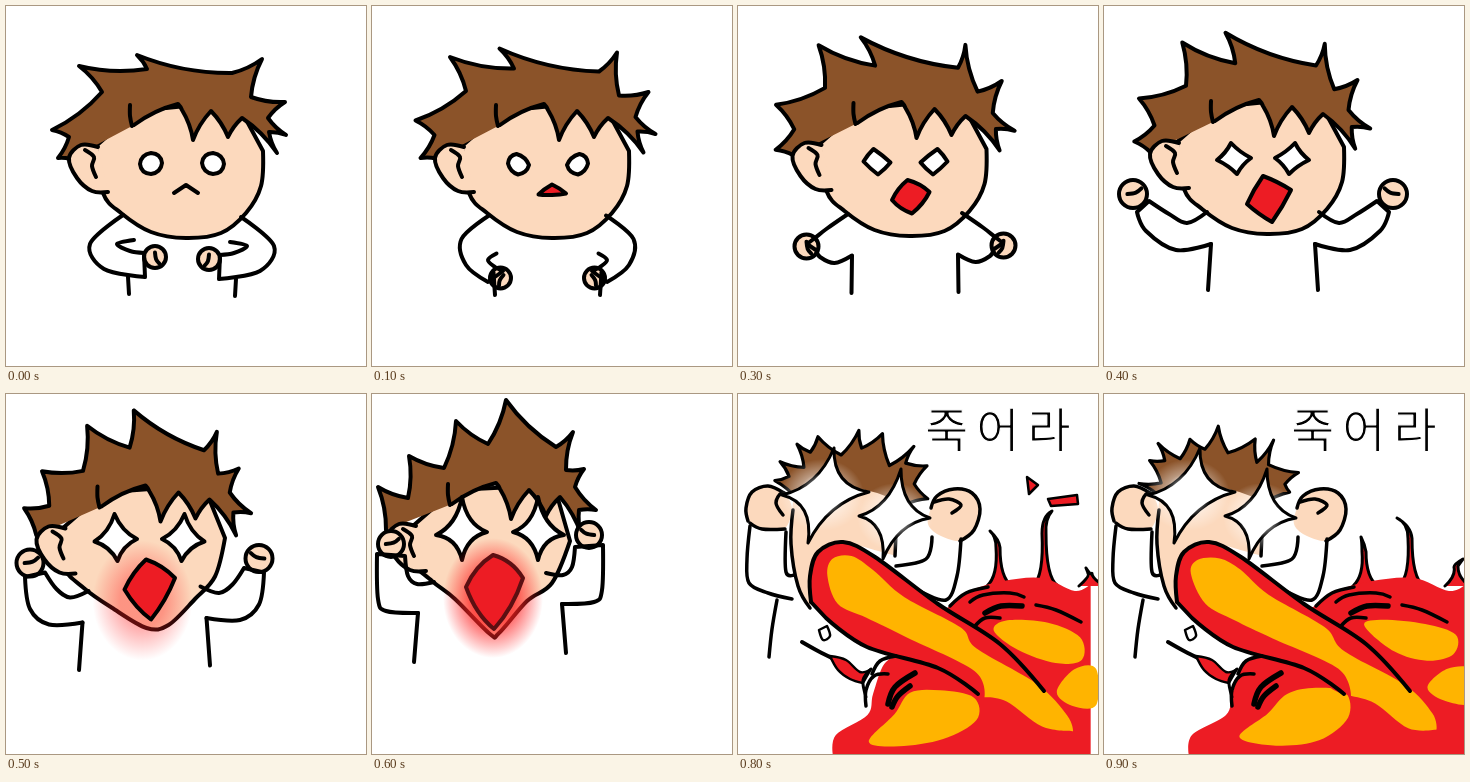
These frames come from a looping animation (360 by 360 pixels, 1100 ms). An HTML page:

```html
<!DOCTYPE html>
<html lang="ko">
<head>
<meta charset="utf-8">
<style>
html, body { margin: 0; width: 100%; height: 100%; overflow: hidden; background: #fff; }
svg { display: block; width: 100vw; height: 100vh; stroke-linecap: round; stroke-linejoin: round; }
text { font: 300 47px "Noto Sans CJK KR", "Noto Sans CJK", sans-serif; letter-spacing: 8px; stroke: #fff; stroke-width: 1.2; }
</style>
</head>
<body>
<svg viewBox="0 0 360 360">
  <defs>
    <radialGradient id="heat">
      <stop offset=".45" stop-color="#f22" stop-opacity=".75"/>
      <stop offset="1" stop-color="#f22" stop-opacity="0"/>
    </radialGradient>
    <radialGradient id="shine">
      <stop offset=".25" stop-color="#fff"/>
      <stop offset="1" stop-color="#fff" stop-opacity="0"/>
    </radialGradient>
  </defs>
  <g id="scene"></g>
</svg>
<script>
const SKIN = '#fcd9bd', HAIR = '#8b5329', RED = '#ed1c24', GOLD = '#ffb400';
const STEP = 100, LOOP = 1100;
const number = /-?\d+(\.\d+)?/g;
const numbers = text => text.match(number).map(Number);
const points = text => text.trim().split(/\s+/).map(numbers);

// Blends key poses; the first one also marks the corners with "*".
function poses(...keys) {
  const values = keys.map(numbers);
  return t => {
    const i = Math.min(Math.floor(t), keys.length - 2);
    let n = 0;
    return keys[0].replace(number, () => {
      const a = values[i][n], b = values[i + 1][n++];
      return a + (b - a) * (t - i);
    });
  };
}

// Hand-drawn wobble, different on every step k.
function boil(text, k, size) {
  let n = 0;
  return text.replace(number, v => +v + size * Math.sin(7 * n++ + 2 * k));
}

// Smooth curve through "x,y" points, sharp at "x,y*".
function curve(text, closed) {
  const pts = text.trim().split(/\s+/).map(s => ({ p: numbers(s), sharp: s.endsWith('*') }));
  const n = pts.length, at = i => pts[(i + n) % n];
  const handle = (i, sign) => {
    const c = at(i), end = !closed && (i === 0 || i === n - 1);
    return c.p.map((v, k) => c.sharp || end ? v : v + sign * (at(i + 1).p[k] - at(i - 1).p[k]) / 6);
  };
  let d = 'M' + pts[0].p;
  for (let i = 0; i < (closed ? n : n - 1); i++)
    d += `C${handle(i, 1)} ${handle((i + 1) % n, -1)} ${at(i + 1).p}`;
  return d + (closed ? 'Z' : '');
}

// Tufts: every edge between tip and notch bows inwards.
const spikes = text => points(text).map(([x, y], i, all) => {
  if (!i) return `M${x},${y}`;
  const [u, v] = all[i - 1];
  return `Q${(x + u) / 2 - (y - v) * .1},${(y + v) / 2 + (x - u) * .1} ${x},${y}`;
}).join('');

// Tips are top, right, bottom, left; the last value is the bulge: 0.9 round, 0.5 straight, 0 star.
function gem(text, fill = '#fff', width = 4, ink = '#000') {
  const tips = points(text), bulge = tips.pop()[0];
  const mid = [0, 1].map(k => tips.reduce((sum, p) => sum + p[k], 0) / 4);
  const sides = tips.map((a, i) => {
    const b = tips[(i + 1) % 4];
    return `Q${mid.map((m, k) => m + bulge * (a[k] + b[k] - 2 * m))} ${b}`;
  });
  return path(`M${tips[0]}${sides.join('')}Z`, fill, width, ink);
}

const path = (d, fill, width, ink = '#000') =>
  `<path d="${d}" fill="${fill}" stroke="${width ? ink : 'none'}" stroke-width="${width}"/>`;
const line = (pts, width = 4, fill = 'none') => path(curve(pts), fill, width);
const shape = (pts, fill, width = 0) => path(curve(pts, true), fill, width);
const glow = (id, x, y, rx, ry, opacity = 1) =>
  `<ellipse cx="${x}" cy="${y}" rx="${rx}" ry="${ry}" fill="url(#${id})" opacity="${opacity}"/>`;
const group = (transform, content) => `<g transform="${transform}">${content}</g>`;
const withMirror = (content, axis, lift = 0) =>
  content + group(`translate(${2 * axis} ${lift}) scale(-1 1)`, content);

// The head is drawn in place and moved by drift.
const drift = poses('0,0', '0,0', '-17,-4', '-48,-9');
const crown = poses(
  '64,153 52,152 63,131 46,124 96,86 73,60 141,63 131,49 226,67 256,53 245,91 279,96 262,112 280,129 263,126 271,147',
  '64,152 45,152 62,127 41,105 92,84 83,42 143,62 124,36 228,64 234,40 249,88 274,76 265,110 287,127 268,125 272,146',
  '62,145 54,102 84,113 85,71 120,83 132,36 164,59 182,15 232,62 249,47 242,85 260,84 251,102 272,125 255,125 257,149');
const fringe = ' 236,112 222,131 205,105 187,134 176,104 172,98 128,119';
const calm = '97,187 115,207 145,226 180,232 215,227 240,207 255,180 257,145* 230,95* 130,105* 90,140*';
const scream = '82,170 108,196 131,214 166,249 175,248 203,216 228,198 246,156 230,100 130,105 90,140';
const jaw = poses(calm, calm, calm, scream);
const eye = poses(
  '145,147 156,157 145,168 134,158 0.9', '144,149 158,161 147,169 138,157 0.7',
  '144,141 164,156 150,172 130,158 0.4', '138,112 163,147 138,175 112,150 0.2');
const mouth = poses(
  '180,179 192,187 180,179 168,187 0.5', '180,178 196,188 180,199 165,190 0.7',
  '176,174 204,188 185,220 160,202 0.55', '169,170 199,193 170,244 142,202 0.65');

// Left half of the body: shoulder, cuff and underarm in one stroke, then side and fist.
const arm = poses(
  '117,209 84,238 98,263 139,271* 138,247* 124,245 111,238 128,234',
  '117,210 95,228 90,255 93,281 124,283 122,277 121,270 121,261',
  '103,206 83,217 65,208 45,195 33,206 42,225 72,244 107,238',
  '62,188 45,190 36,182 33,162 5,160 6,205 14,217 46,219');
const side = poses('122,271 123,288', '121,262 123,290', '107,238 104,284', '46,219 42,268');
const hand = poses('149,251 11 90', '108,293 10 180', '29,188 14 0', '19,150 13 0');
const axis = poses('176,2', '175,-2', '159,0', '118,-9');

function fist(text) {
  const [x, y, r, angle] = numbers(text);
  return group(`translate(${x} ${y}) rotate(${angle}) scale(${r / 10})`,
    `<circle r="10" fill="${SKIN}" stroke="#000" stroke-width="${40 / r}"/>` + line('-4,0 2,-1 6,-4', 40 / r));
}

function charge(t) {
  const heat = Math.max(0, t - 2);
  const swell = t < 1 ? t : t < 2 ? 1 + (t - 1) / 4 : 1.25 + heat * .75;
  const head = shape(jaw(t), SKIN, 4) + path(spikes(crown(swell) + fringe), HAIR, 4) +
    line('124,99 124,110 126,120') +
    line('92,141 75,139 63,152 71,172 86,185 102,186', 4, SKIN) + line('79,144 88,151 86,160 90,171') +
    withMirror(gem(eye(t)), 176) +
    glow('heat', 169, 213, 50, 60, heat) +
    gem(mouth(t), RED, 4, heat > .9 ? '#5c0f12' : '#000');
  const half = fist(hand(t)) + line(arm(t)) + line(side(t));
  return group(`translate(${drift(t)})`, head) + withMirror(half, ...numbers(axis(t)));
}

const wildHair = '56,104 38,90 55,85 42,65 62,70 58,52 76,62 82,42 100,57 118,36 126,58 148,41 150,68 172,50 168,72 193,75 177,88 186,101 165,112';
const hornTips = [
  ['245,147', '340,135', '365,163'],
  ['252,137', '314,117', '348,174'],
  ['257,143', '293,124', '359,165']
];
const pools = [
  '262,234 278,226 320,228 350,240 350,262 325,268 290,256',
  '325,295 345,275 368,274 366,308 340,308',
  '137,345 165,320 182,298 210,293 242,300 246,325 215,345 170,350'
];
const core = '88,181 95,166 115,163 135,175 165,202 222,234 240,256 300,290 328,320 334,337* 305,334 270,308 246,302* 235,276 170,245 130,225 100,209';
const beamTop = '73,208* 72,182 80,158 105,148 137,163 200,210 262,250 306,297';
const beamLow = ' 240,300 200,274 129,253 88,224* 73,208*';
const cracks = ['128,312 128,296 136,282 150,280', '134,280 142,267 158,262', '212,212 228,199 250,193',
  '232,208 245,201 272,199 286,203', '237,232 247,224 262,224', '298,211 318,216 343,228'];
const gashes = ['150,310 157,293 177,279', '154,313 160,302 172,292', '247,219 263,212 284,212'];

// Tapered horn that bends towards its tip.
function horn(x, y, tip) {
  const [tx, ty] = numbers(tip), bend = ty + (y - ty) * .3;
  return path(`M${x - 11},${y}Q${x},${y - 10} ${x - 2},${bend}Q${x - 2},${ty + 5} ${tx},${ty}` +
    `Q${x + 1},${ty + 8} ${x + 2},${bend}Q${x + 2},${y - 8} ${x + 14},${y}`, RED, 3);
}

function fighter(k) {
  const arms = ['48,138 48,178 58,180', '12,132 9,165 11,189 30,199 54,205', '39,206 34,235 31,263',
    '194,143 188,165 158,172', '223,145 219,182 208,206 180,196', '55,104 44,99 38,109 45,121',
    '12,129 24,135 47,135', '196,108 211,105 223,111 214,119'];
  const leftFist = '10,127 8,114 14,98 30,92 46,99', rightFist = '193,114 199,102 216,95 234,99 242,115 236,136 222,147';
  const hair = boil(wildHair, k, 4);
  return shape(leftFist + ' 54,115 46,135 24,134', SKIN) + shape(rightFist + ' 201,141 190,130', SKIN) +
    [leftFist, rightFist, ...arms].map(a => line(a, 3.5)).join('') +
    shape('57,95* 53,130 55,165 61,196 72,214* 78,180 80,158 105,147* 158,162* 159,138 165,105* 110,82*', SKIN) +
    line('55,116 53,150 60,192 72,214', 3.5) + line('158,140 157,162', 3.5) +
    path(spikes(hair + ' 112,93 70,98'), HAIR, 0) + path(spikes(hair), 'none', 3.2) +
    glow('shine', 84, 101, 42, 36, .75) + glow('shine', 157, 123, 38, 34, .75);
}

function lava(k, sway) {
  const mass = shape('85,362* 88,341 122,321 128,300 140,270 158,260* 195,222* 212,211 232,197 268,187 310,184 345,197 362,190* 362,362*', RED);
  return hornTips[k].map((tip, i) => horn(260 + 46 * i, 192, tip)).join('') +
    group(`translate(${16 * sway} 0) scale(${1 - .07 * sway} 1)`, mass) +
    group(`translate(${-8 * sway} ${2 * sway})`, pools.map(p => shape(boil(p, k, 2), GOLD)).join('')) +
    path(curve(beamTop + beamLow), RED, 0) + shape(boil(core, k, 1.5), GOLD) +
    line(beamTop) + line(beamLow) +
    cracks.map(c => line(c, 3.5)).join('') + gashes.map(g => line(g, 5.5)).join('');
}

function blast(k) {
  const sway = Math.round(Math.sin(k * Math.PI / 2));
  const drops = line('64,248 80,257 98,266') +
    shape('92,262* 108,266 122,278 133,275* 125,289* 112,285 100,276', RED, 2.5) +
    line('133,275 125,286 128,303', 3) + shape('81,236* 89,232* 92,242 85,246', '#fff', 2.5);
  const chips = shape('289,83* 300,91* 291,100*', RED, 2.5) + shape('310,105* 339,101* 340,110* 313,112*', RED, 2.5);
  const stars = gem('96,54 131,98 70,149 44,101 0.17', '#fff', 3) + gem('163,75 192,124 145,165 121,122 0.17', '#fff', 3) +
    glow('shine', 84, 101, 23, 22) + glow('shine', 156, 123, 22, 21);
  return fighter(k) + lava(k, sway) + drops + (sway ? chips : '') + stars + '<text x="187" y="53">죽어라</text>';
}

const scene = document.getElementById('scene');
let shown = -1;
function tick() {
  const step = Math.min(Math.floor(performance.now() % LOOP / STEP), 9);
  if (step !== shown) {
    shown = step;
    scene.innerHTML = step < 7 ? charge(step / 2) : blast(step - 7);
  }
  requestAnimationFrame(tick);
}
tick();
</script>
</body>
</html>
```
